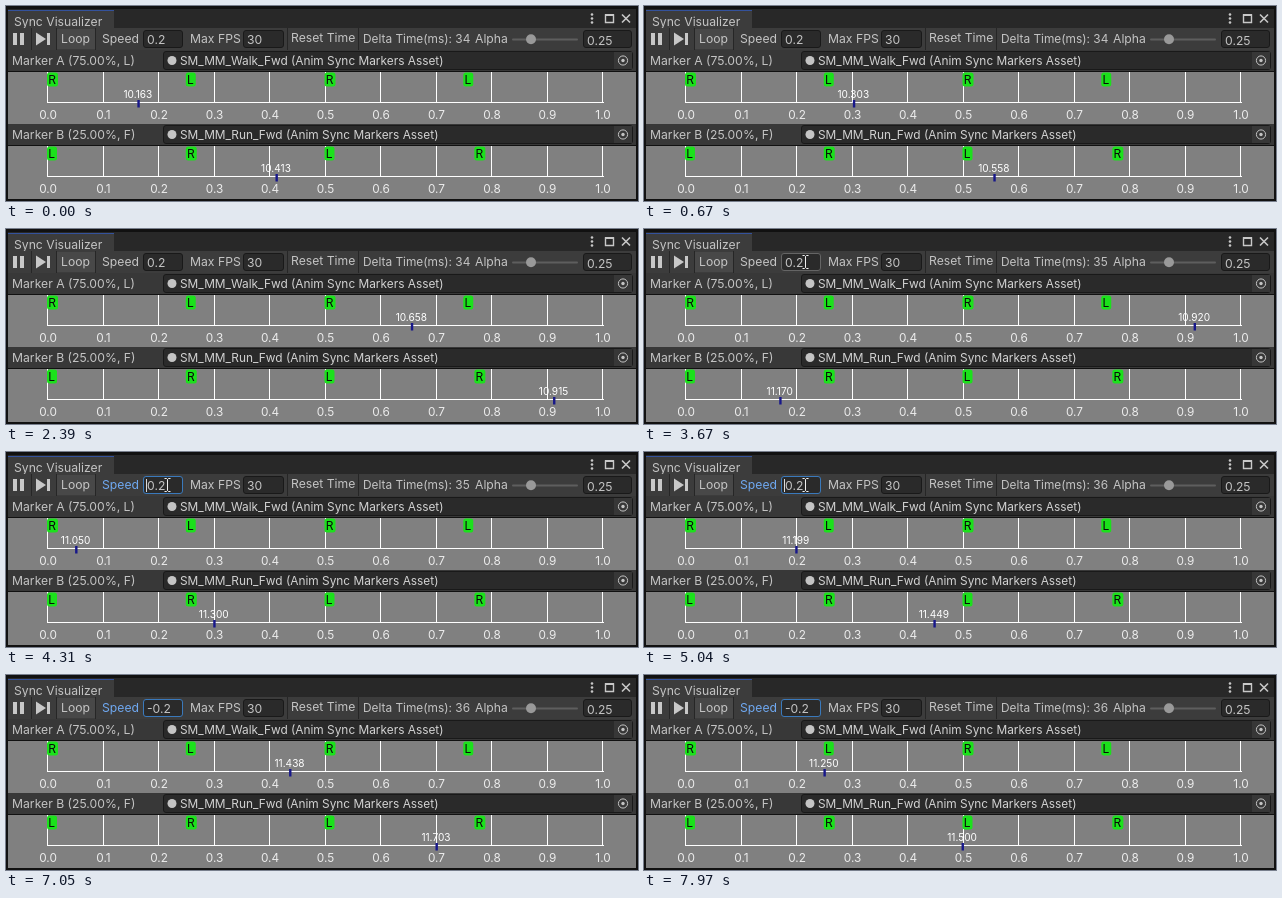
These frames come from a looping animation (632 by 195 pixels, 8 s). An HTML page:

```html
<!DOCTYPE html>
<html lang="en">
<head>
<meta charset="utf-8">
<title>Sync Visualizer</title>
<style>
  html, body { margin: 0; width: 100%; height: 100%; overflow: hidden; background: #191919; }
  svg { display: block; width: 632px; height: 195px; font-family: Inter, sans-serif; }
  text { fill: #c4c4c4; font-size: 12.2px; white-space: pre; }
  .dense { font-size: 11.87px; }
  .time { fill: #fff; font-size: 10.1px; text-anchor: middle; }
  .scale { fill: #ececec; font-size: 11.8px; text-anchor: middle; }
  .key { fill: #0a0a0a; font-size: 12px; }
</style>
</head>
<body>
<svg id="stage" viewBox="0 0 632 195"></svg>
<script>
const LOOP = 8000, STEP = 40;
const HOVER = 3400, CLICK = 3950, TYPE = 5650, COMMIT = 6530;
const stage = document.getElementById('stage');

function add(tag, attrs, content) {
  const node = document.createElementNS('http://www.w3.org/2000/svg', tag);
  for (const name in attrs) node.setAttribute(name, attrs[name]);
  if (content !== undefined) node.textContent = content;
  stage.append(node);
  return node;
}
const rect = (x, y, width, height, fill, more) => add('rect', { x, y, width, height, fill, ...more });
const path = (d, stroke, width = 1, more) => add('path', { d, stroke, 'stroke-width': width, fill: 'none', ...more });
const circle = (cx, cy, r, fill, more) => add('circle', { cx, cy, r, fill, ...more });
// y is the vertical middle of the capitals
const label = (x, y, content, more) => add('text', { x, y: y + 4.4, ...more }, content);
const field = (x, y, w, h) =>
  rect(x + .5, y + .5, w - 1, h - 1, '#2a2a2a', { rx: 2.5, stroke: '#191919' });
const show = (node, on) => node.setAttribute('visibility', on ? 'visible' : 'hidden');

// Window frame and title bar
rect(0, 0, 632, 195, '#111');
rect(2, 3, 628, 19, '#282828');
rect(2, 4, 106, 18, '#3c3c3c');
rect(2, 4, 106, 1, '#34529c');
label(8, 15.4, 'Sync Visualizer', { fill: '#d2d2d2' });
for (const y of [8.5, 12.5, 16.5]) circle(586, y, 1.3, '#c8c8c8');
path('M599.5 9h8v7.5h-8z', '#c8c8c8', 1.4);
path('M599 9h9', '#c8c8c8', 2);
path('M616 8.5l8 8m0-8l-8 8', '#c8c8c8', 1.6);

// Toolbar
rect(2, 22, 628, 22, '#3c3c3c');
rect(51, 23, 38, 20, '#484848');
for (const x of [25, 50, 89, 281, 352]) rect(x, 22, 1, 22, '#262626');
rect(7, 27, 4, 12, '#c8c8c8');
rect(14, 27, 4, 12, '#c8c8c8');
path('M30 26.5v13l10-6.5z', 'none', 0, { fill: '#c8c8c8' });
rect(41, 27, 3, 12, '#c8c8c8');
label(55, 33, 'Loop');
const speedLabel = label(96, 33, 'Speed');
const speedField = field(137, 24, 40, 18);
const speedText = label(141, 33.6, '0.2', { fill: '#d2d2d2' });
label(184, 33, 'Max FPS');
field(237, 24, 41, 18);
label(241, 33.6, '30', { fill: '#d2d2d2' });
label(285, 31.8, 'Reset Time');
const deltaText = label(357, 33, '', { class: 'dense' });
label(469, 33, 'Alpha');
rect(506, 32.5, 66, 2, '#5e5e5e', { rx: 1 });
circle(525, 33.3, 5, '#999');
field(577, 24, 49, 18);
label(581, 34.3, '0.25', { fill: '#d2d2d2' });

const scaleX = v => 42 + 555 * v;
const tickX = v => 42.5 + 552.5 * v;

function track(top, title, asset, keys) {
  rect(2, top, 628, 21, '#383838');
  label(6, top + 10.5, title, { fill: '#b4b4b4' });
  field(157, top + 1, 470, 19);
  circle(166, top + 10.5, 4.5, '#c4c4c4');
  label(174, top + 10.5, asset, { class: 'dense', style: 'fill:#d2d2d2' });
  rect(608, top + 2, 18, 17, '#373737');
  circle(617, top + 10.5, 4.6, 'none', { stroke: '#c4c4c4' });
  circle(617, top + 10.5, 1.7, '#c4c4c4');

  rect(2, top + 22, 628, 53, '#808080');
  const axis = top + 53;
  for (let i = 0; i <= 10; i++) {
    const x = scaleX(i / 10);
    rect(Math.round(x) - 1, axis - 31, 1, 31, '#fff');
    label(x, axis + 11.5, (i / 10).toFixed(1), { class: 'scale' });
  }
  rect(41, axis - 1, 557, 1, '#fff');
  for (const [v, side] of keys) {
    const x = scaleX(v) - 1;
    rect(x, axis - 30.5, side === 'R' ? 11 : 10, 14, '#1be11b', { rx: 2.5 });
    label(x + 1.2, axis - 23.6, side, { class: 'key' });
  }
  const tick = rect(0, axis - 3, 2.4, 7.5, '#17178a');
  const time = label(0, axis - 9, '', { class: 'time' });
  return value => {
    const x = tickX(value % 1);
    tick.setAttribute('x', x - 1.2);
    time.setAttribute('x', x - .7);
    time.textContent = value.toFixed(3);
  };
}

const setA = track(44, 'Marker A (75.00%, L)', 'SM_MM_Walk_Fwd (Anim Sync Markers Asset)',
  [[0, 'R'], [.25, 'L'], [.5, 'R'], [.75, 'L']]);
const setB = track(118, 'Marker B (25.00%, F)', 'SM_MM_Run_Fwd (Anim Sync Markers Asset)',
  [[0, 'L'], [.25, 'R'], [.5, 'L'], [.77, 'R']]);
rect(0, 193, 632, 2, '#111');

const caret = rect(0, 27, 1, 13, '#dcdcdc');
const beam = path('M158.5 26.5h2l1 1 1-1h2M161.5 27.5v11M158.5 39.5h2l1-1 1 1h2', '#f0f0f0');

// Leading time, in ms and cycles: forward, a short stall, then backward
const lead = [[0, 10.163], [1390, 10.454], [2390, 10.658], [3670, 10.920], [5040, 11.199],
  [6120, 11.425], [COMMIT, 11.511], [6690, 11.511], [7970, 11.250], [8010, 11.242]];
// Follower phase for each leader phase, so that the feet stay matched
const follow = [[0, .25], [.25, .5], [.5, .77], [.75, 1], [1, 1.25]];
const delta = [[0, 34], [1000, 35], [2000, 34], [3000, 35], [4500, 36], [5600, 35], [7000, 36]];
// Starts of the runs of evenly timed updates
const runs = [-10, 5000, 6610];

function interpolate(points, x) {
  const i = Math.max(1, points.findIndex(p => p[0] >= x));
  const [[x0, y0], [x1, y1]] = [points[i - 1], points[i]];
  return y0 + (y1 - y0) * (x - x0) / (x1 - x0);
}

function draw(ms) {
  const start = runs.filter(r => r <= ms).pop();
  const t = Math.max(0, start + Math.floor((ms - start) / STEP) * STEP);
  const a = interpolate(lead, t);
  setA(a);
  setB(Math.floor(a) + interpolate(follow, a % 1));

  const base = delta.filter(d => d[0] <= t).pop()[1];
  const flicker = base === 35 ? 36 : 35;
  deltaText.textContent = `Delta Time(ms): ${Math.floor(t / STEP) % 7 === 5 ? flicker : base}`;

  const focused = t >= CLICK, typed = t >= TYPE;
  speedLabel.setAttribute('style', focused ? 'fill:#6fa8f0' : '');
  speedField.setAttribute('stroke', focused ? '#3a79bb' : t >= HOVER ? '#656565' : '#191919');
  speedText.textContent = typed ? '-0.2' : '0.2';

  const sinceKey = t - (typed ? TYPE : CLICK);
  show(caret, focused && t < COMMIT && sinceKey % 1000 < 500);
  caret.setAttribute('x', typed ? 146 : 140);
  show(beam, t >= HOVER && t < COMMIT);
}

function frame() {
  draw(performance.now() % LOOP);
  requestAnimationFrame(frame);
}
frame();
</script>
</body>
</html>
```
